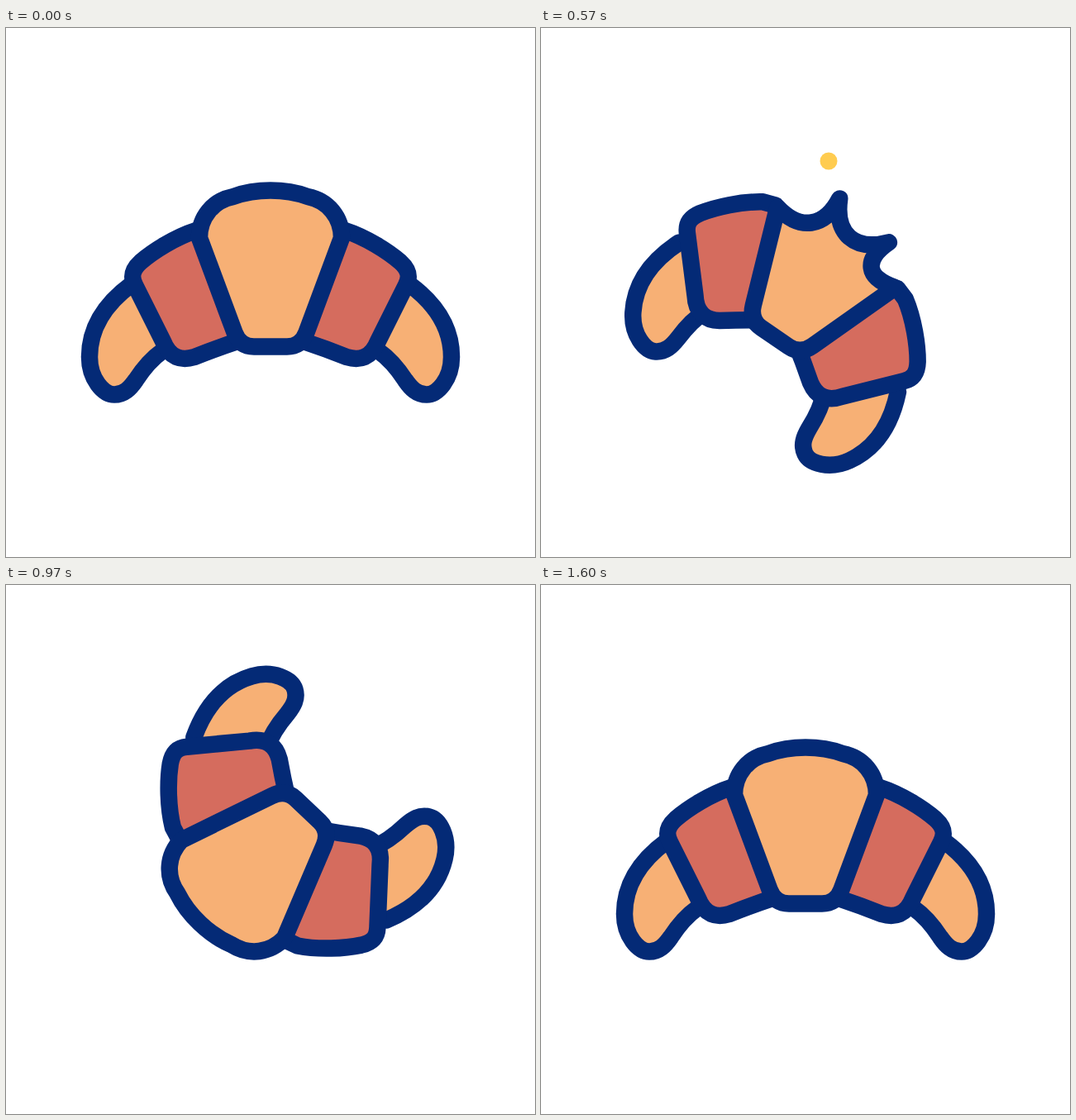
Recreate the animation shown at these times as an HTML page. Size 640 px wide and 640 px high, loop 2000 ms.

```html
<!DOCTYPE html>
<html lang="en">
<head>
<meta charset="utf-8">
<title>Croissant</title>
<style>
  html, body { margin: 0; width: 100%; height: 100%; overflow: hidden; background: #fff; }
  svg { display: block; width: 100%; height: 100%; }
  .line { fill: none; stroke: #042a76; stroke-width: 20.5; stroke-linecap: round; stroke-linejoin: round; }
  .dough { fill: #f7b075; }
  .crust { fill: #d56c5e; }
  #sparks { stroke: #ffcc50; stroke-width: 21; stroke-linecap: round; }
</style>
</head>
<body>
<svg viewBox="0 0 640 640">
  <g id="sparks"></g>
  <g id="body">
    <g id="left"></g>
    <g id="right" transform="translate(640) scale(-1 1)"></g>
    <path id="middle" class="line" style="fill:#f7b075"/>
  </g>
</svg>
<script>
const LOOP = 2000;
const $ = id => document.getElementById(id);

function add(parent, tag, attrs = {}) {
  const el = document.createElementNS('http://www.w3.org/2000/svg', tag);
  for (const k in attrs) el.setAttribute(k, attrs[k]);
  parent.appendChild(el);
  return el;
}

// An open outline; the fill reaches further, under the neighbouring piece.
function piece(parent, cls, d, tuck) {
  add(parent, 'path', { class: cls, d: d + 'L' + tuck + 'Z' });
  add(parent, 'path', { class: 'line', d });
}

// One half: a crust piece with the tail hinged behind it.
const halves = [$('left'), $('right')].map(host => {
  const side = add(host, 'g'), tail = add(side, 'g');
  piece(tail, 'dough', 'M152 310C118 335 101 365 101 398C101 425 118 443.5 131 443.5' +
    'C143 443.5 150 436 157 426Q172 403 189 391', '196 345');
  piece(side, 'crust', 'M246 244L230 245C205 253 178 270 163 283C152 293 151 301 156 311' +
    'L190 379C198 399 212 403 228 398Q253 388 280 379', '266 305');
  return { side, tail };
});

// Upper edge of the middle piece: corner points and the bulge between them.
const WHOLE = { pts: [[234, 254], [275, 204], [365, 204], [406, 254]], bulge: [12, 7.5, 12] };
const BITTEN = { pts: [[234, 254], [290, 203], [369, 213], [406, 254]], bulge: [-24, -27, -25] };

const SPARKS = [
  { from: [276, 201], to: [235, 171], lead: 30 },
  { from: [297, 203], to: [287, 143], lead: 30 },
  { from: [303, 213], to: [348, 161], lead: 0 }
];
for (const s of SPARKS) s.el = add($('sparks'), 'line');

const mix = (a, b, k) => a + (b - a) * k;
function ease(t, a, b) {
  const u = Math.min(1, Math.max(0, (t - a) / (b - a)));
  return u * u * (3 - 2 * u);
}

// A curve from p to q that stands out by h on its left side.
function arc([px, py], [qx, qy], h) {
  const dx = qx - px, dy = qy - py, k = h * 4 / 3 / Math.hypot(dx, dy);
  const nx = dy * k, ny = -dx * k;
  return `C${px + 0.3 * dx + nx} ${py + 0.3 * dy + ny} ` +
    `${qx - 0.3 * dx + nx} ${qy - 0.3 * dy + ny} ${qx} ${qy}`;
}

function middle(bite) {
  const pts = WHOLE.pts.map((p, i) => p.map((v, j) => mix(v, BITTEN.pts[i][j], bite)));
  let d = 'M' + pts[0];
  WHOLE.bulge.forEach((h, i) => {
    d += arc(pts[i], pts[i + 1], mix(h, BITTEN.bulge[i], bite));
  });
  return d + 'L363.4 368.5Q357 385.5 340 385.5H300Q283 385.5 276.6 368.5Z';
}

// Key times and angles: wind up, spin, settle.
const SPIN = [[30, 0], [320, -31], [570, 34], [970, 223], [1130, 307], [1280, 351], [1600, 360]];

function slope(i) {
  if (i === 0 || i === SPIN.length - 1) return 0;
  const rate = ([t0, v0], [t1, v1]) => (v1 - v0) / (t1 - t0);
  const a = rate(SPIN[i - 1], SPIN[i]), b = rate(SPIN[i], SPIN[i + 1]);
  return a * b <= 0 ? 0 : 2 * a * b / (a + b);
}

function angle(t) {
  if (t <= SPIN[0][0]) return 0;
  const i = SPIN.findIndex(k => t <= k[0]);
  if (i < 0) return 360;
  const [t0, v0] = SPIN[i - 1], [t1, v1] = SPIN[i];
  const h = t1 - t0, u = (t - t0) / h, w = 1 - u;
  return mix(v0, v1, u * u * (3 - 2 * u)) + h * u * w * (slope(i - 1) * w - slope(i) * u);
}

function draw(t) {
  const push = ease(t, 30, 300) - ease(t, 300, 540);
  const bend = ease(t, 30, 530) - ease(t, 900, 1600);
  const bite = ease(t, 230, 310) - ease(t, 600, 740);

  $('body').setAttribute('transform',
    `translate(${40 * push} ${60 * push}) rotate(${angle(t)} 320 320)`);
  for (const { side, tail } of halves) {
    side.setAttribute('transform', `rotate(${-15 * bend} 274 306)`);
    tail.setAttribute('transform', `rotate(${-16 * bend} 204 322)`);
  }
  $('middle').setAttribute('d', middle(bite));

  for (const { el, from, to, lead } of SPARKS) {
    const time = t + lead;
    const tail = ease(time, 370, 570), head = ease(time, 270, 418);
    el.style.display = time > 270 && time < 598 ? '' : 'none';
    [tail, head].forEach((k, i) => {
      el.setAttribute('x' + (i + 1), mix(from[0], to[0], k));
      el.setAttribute('y' + (i + 1), mix(from[1], to[1], k));
    });
  }
}

const start = performance.now();
function tick() {
  draw((performance.now() - start) % LOOP);
  requestAnimationFrame(tick);
}
tick();
</script>
</body>
</html>
```
